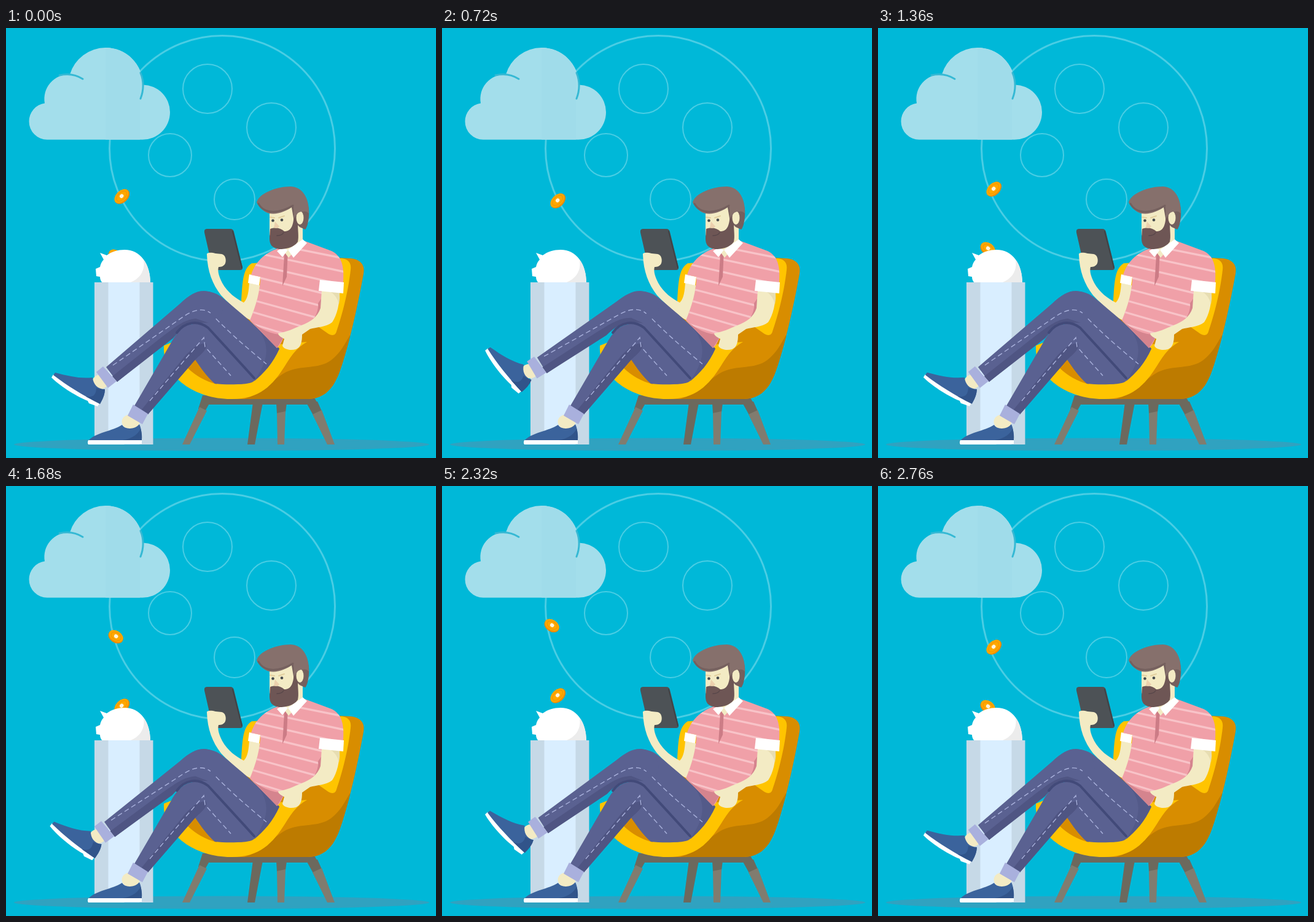
Animation of 700x700 px, one loop 2800 ms. Source, as an HTML page with a canvas:

```html
<!DOCTYPE html>
<html lang="en">
<head>
<meta charset="utf-8">
<title>Savings</title>
<style>
html, body { margin: 0; width: 100%; height: 100%; overflow: hidden; background: #00b8d8; }
canvas { display: block; }
</style>
</head>
<body>
<canvas id="stage" width="700" height="700"></canvas>
<script>
const ctx = document.getElementById('stage').getContext('2d');
const PERIOD = 1400, STEP = 40;
const C = {
  sky: '#00b8d8', outline: 'rgba(255,255,255,.29)', cloud: '#a3deeb', cloudShade: '#a0dcea',
  skin: '#f3ebc4', skinShade: '#e7ddb2', shirt: '#f0a0a8', shirtShade: '#d5848e', stripe: '#f8c3c8',
  pants: '#5a6191', pantsShade: '#4f5583', hipShade: '#535a89', crease: '#424a79', stitch: '#a9b1dc',
  cuff: '#a9b0dd', shoe: '#3b639c', shoeShade: '#31548a', yellow: '#ffc400', orange: '#d88d00',
  brown: '#bd7b00', wood: '#6c695d', woodLight: '#807c6f', hair: '#86706c', hairShade: '#75605e',
  beard: '#6e5655'
};

function fill(color, d) {
  ctx.fillStyle = color;
  ctx.fill(new Path2D(d));
}
function line(color, width, d, dash = []) {
  ctx.strokeStyle = color;
  ctx.lineWidth = width;
  ctx.lineCap = dash.length ? 'butt' : 'round';
  ctx.setLineDash(dash);
  ctx.stroke(new Path2D(d));
}
function oval(color, x, y, rx, ry = rx, turn = 0) {
  ctx.fillStyle = color;
  ctx.beginPath();
  ctx.ellipse(x, y, rx, ry, turn, 0, Math.PI * 2);
  ctx.fill();
}
function ring(x, y, r, width) {
  ctx.strokeStyle = C.outline;
  ctx.lineWidth = width;
  ctx.setLineDash([]);
  ctx.beginPath();
  ctx.arc(x, y, r, 0, Math.PI * 2);
  ctx.stroke();
}
function box(color, x, y, w, h) {
  ctx.fillStyle = color;
  ctx.fillRect(x, y, w, h);
}
function clipped(d, draw) {
  ctx.save();
  ctx.clip(new Path2D(d));
  draw();
  ctx.restore();
}
function rotateAbout(x, y, degrees) {
  ctx.translate(x, y);
  ctx.rotate(degrees * Math.PI / 180);
  ctx.translate(-x, -y);
}

function backdrop() {
  box(C.sky, 0, 0, 700, 700);
  ring(352, 196, 183.5, 3);
  ring(328, 99, 40, 2);
  ring(432, 162, 40, 2);
  ring(267, 207, 35, 2);
  ring(372, 279, 33, 2);
  oval('#30a2c0', 351, 678, 338, 10.5);
}

function coin(x, y, rx, turn) {
  ctx.save();
  ctx.translate(x, y);
  ctx.rotate(turn);
  oval('#f08c00', 0, .6, rx, 9.6);
  oval('#ffa800', -.3, -.7, rx - .6, 8.4);
  ctx.strokeStyle = '#f39200';
  ctx.lineWidth = 1;
  ctx.setLineDash([]);
  ctx.beginPath();
  ctx.ellipse(0, -.5, rx - 4, 5.8, 0, 0, Math.PI * 2);
  ctx.stroke();
  oval('#fff4dc', 0, -.4, 3.4, 3);
  ctx.restore();
}

function coins(t) {
  const fall = start => 90 + (start - 90 + .3 * t + 420) % 420;
  for (const start of [274, 65]) coin(188.5, fall(start), 14.2, -.78);
  for (const start of [161, -49]) coin(179, fall(start), 13, .58);
}

function cloud() {
  const shape = 'M67 181.8A29.5 29.8 0 0 1 37.5 152A29.5 29.8 0 0 1 63 122.5A40 40 0 0 1 104 75.5A61 61 0 0 1 162 32A61 61 0 0 1 223 92.5A44.4 44.6 0 0 1 267 137A44.8 44.8 0 0 1 222 181.8Z';
  fill(C.cloud, shape);
  clipped(shape, () => box(C.cloudShade, 162, 30, 56, 152));
  line('#36b9d4', 3, 'M87 77C100 74 114 76 125 83');
  line('#36b9d4', 3, 'M219 73C225 88 224 102 219 115');
}

function pigAndColumn() {
  const pig = 'M153 366L164 370C172 364 182 361 193 361C219 361 235 384 235 415H157C154 412 153 408 153 405L147 404L146 392L153 389C154 384 156 380 159 377Z';
  fill('#fff', pig);
  clipped(pig, () => fill('#ececec', 'M200 415C216 410 227 397 224 378L240 376V415Z'));
  box('#c6d9e7', 144, 414, 95.5, 264);
  box('#d9eeff', 166.5, 414, 51, 264);
}

function chair() {
  fill(C.wood, 'M320 598H500L508 613H330L325 622L313 620Z M402 610H418L405 678H393Z M440 610H457L455 626L441 627Z M489 610L507 608L515 626L500 630Z');
  fill(C.woodLight, 'M315 617L327 623L299 678H287Z M441 627L455 624L453 678H442Z M499 629L514 622L535 678H523Z');
  const shell = 'M400 400L541 374L560 375C577 376 585 386 582 400C575 440 562 500 551 535C541 568 531 604 490 604H360Z';
  fill(C.orange, shell);
  clipped(shell, () => fill(C.brown, 'M385 605C420 594 432 573 456 560C483 548 508 556 529 541C545 529 552 513 560 500V605Z'));
  fill(C.yellow, 'M383 445C385 410 386 392 400 383L540 375C556 374 563 381 561 394C557 430 547 468 538 494C536 501 531 501 525 498L505 484L400 480Z');
  fill(C.yellow, 'M257 517L300 500L445 515L490 511C474 520 466 531 456 547C434 583 412 604 368 604C312 605 254 570 257 517Z');
  fill(C.orange, 'M309 537L295 553C310 567 325 575 343 580L330 545Z');
}

function leftArm() {
  fill('#4d5256', 'M327 327H365Q370 327 371 332L385 389Q386 394 381 394H342Q337 394 336 390L323 333Q322 327 327 327Z');
  line('#3f4346', 2, 'M369 331L384 390');
  fill(C.skin, 'M327 369C326 365 335 365 341 367L351 368C357 369 359 377 357 383C355 388 350 389 346 389C344 396 347 405 352 415C361 431 374 440 387 447C394 440 395 428 396 415L413 419C412 442 409 464 400 476C392 475 369 455 350 435C336 417 328 396 327 369Z');
  fill('#fff', 'M396 401L414 405L412 419L394 415Z');
}

function raisedFoot() {
  oval(C.skin, 153.5, 576, 13, 11.5);
  fill('#fff', 'M77 564L154 608L149 616L135 611L133 607C111 598 86 581 74 569Z');
  fill(C.shoe, 'M80 561C103 567 120 571 141 569C142 580 149 588 161 588C161 597 157 605 153 612C127 599 99 582 77 565Z');
  fill(C.shoeShade, 'M147 586Q154 589 161 588C161 597 157 605 153 612L130 600Q147 603 147 586Z');
}

function crossedLeg(swing) {
  fill(C.pants, 'M296 440C310 427 332 424 351 438C366 450 382 464 397 477L445 522C435 545 420 562 402 576C390 582 365 580 350 575L310 495Z');
  fill(C.hipShade, 'M404 483L445 522C434 546 420 562 404 575C424 546 436 516 404 483Z');
  line(C.stitch, 1.4, 'M333 464C358 491 391 520 424 547', [8, 5]);
  ctx.save();
  rotateAbout(322, 460, 5.5 * swing);
  ctx.save();
  rotateAbout(155, 573, 14.5 * swing);
  raisedFoot();
  ctx.restore();
  fill(C.pants, 'M163 552L283 449C298 435 309 428 322 428C341 428 354 444 352 462C345 480 312 474 289 486C275 495 265 508 250 519L181 576Z');
  fill(C.pantsShade, 'M181 576L173 567L255 502C277 486 289 475 309 473L330 480C300 478 287 487 272 505Z');
  line(C.stitch, 1.4, 'M174 549L290 469C309 456 324 457 333 464', [8, 5]);
  fill(C.cuff, 'M147 560L158 551L180 575L166 586Z');
  ctx.restore();
}

function standingLeg() {
  oval(C.skin, 203, 641, 14.5, 12);
  fill('#fff', 'M134 671H221V677H193L192 678H134Q132 675 134 671Z');
  fill(C.shoe, 'M135 671C145 659 174 656 189 646C193 654 210 654 217 645C221 653 221 663 221 671Z');
  fill(C.shoeShade, 'M190 671C207 668 216 660 219 652Q222 662 221 671Z');
  fill(C.pants, 'M209 615L269 512C284 483 308 473 329 490C352 515 380 545 406 573C390 582 360 581 340 579C327 568 317 553 308 540L231 629Z');
  fill(C.pantsShade, 'M231 629L221 621L293 532C306 519 314 514 325 513C330 521 319 530 308 540Z');
  line(C.crease, 4, 'M278 496C291 478 312 475 329 488C352 513 377 540 404 570');
  line(C.stitch, 1.4, 'M234 607L322 504L324 519L366 566', [8, 5]);
  fill(C.cuff, 'M207 613L231 628L222 645L198 631Z');
}

function torso() {
  const shirt = 'M445 358C420 366 405 382 399 402L414 405C414 428 407 452 397 476L441 521C447 517 450 507 455 499L507 484C516 462 518 443 520 430L549 414C551 386 546 371 530 363L487 347Z';
  fill(C.shirt, shirt);
  clipped(shirt, () => {
    for (let i = -1; i < 8; i++) {
      const y = 361 + i * 20.7, slope = .2 + i * .015;
      line(C.stripe, 3.2, `M390 ${y - 90 * slope}L555 ${y + 75 * slope}`);
    }
    fill(C.shirtShade, 'M397 476L441 521L455 499Q426 501 397 476Z M522 428L508 448Q510 466 490 488L515 490Z');
  });
  fill('#cc7c86', 'M453 369L459 361L457 405L450 420Z');
  fill(C.skin, 'M514 427L542 430C544 447 539 467 531 479C521 487 505 487 495 490L482 499C482 511 480 520 472 523C462 526 451 522 450 517L453 506C447 503 443 500 443 497C457 495 469 489 481 484C496 478 507 471 512 456Z');
  fill(C.skinShade, 'M526 428L543 430Q544 440 542 450Q539 435 526 428Z');
  fill('#fff', 'M511 410L550 414L549 432L509 428Z');
}

function head() {
  fill(C.skin, 'M465 320H483V348L460 374L449 359Z');
  fill('#fff', 'M441 363L449 358L459 361L483 344L490 350L468 374L459 361L450 373Z');
  fill(C.skin, 'M429 296L472 286L474 340L440 350L429 337Z');
  fill(C.hairShade, 'M462 275C493 275 494 290 493 307C492 317 490 325 487 328L478 324L469 315Z');
  fill(C.beard, 'M430 327C439 324 448 326 453 331C465 331 469 321 469 296L475 317C475 329 477 340 475 348C468 358 455 360 445 360C433 358 429 353 429 342Z');
  oval(C.skin, 478.5, 309, 6, 11);
  fill(C.hair, 'M408 284C412 269 440 258 464 258C484 259 494 279 493 302Q489 297 483 299C476 298 472 304 469 311L468 290C455 299 442 304 429 302C418 299 412 291 408 284Z');
  line(C.hairShade, 3, 'M411 286C421 304 445 302 467 289');
  line('#e2cf9e', 2, 'M430 308L437 309M444 309L453 306');
  fill('#ecd0ad', 'M438 315L445 323Q442 327 436 325Z');
  oval('#454a4c', 434.5, 313.5, 2.3);
  oval('#454a4c', 449, 312.5, 2.3);
  line('#57464a', 1.4, 'M441 338Q449 338 452 333');
}

function render(now) {
  const t = Math.floor(now / STEP) * STEP % PERIOD;
  const swing = (1 - Math.cos(2 * Math.PI * t / PERIOD)) / 2;
  backdrop();
  coins(t);
  cloud();
  pigAndColumn();
  chair();
  leftArm();
  crossedLeg(swing);
  standingLeg();
  torso();
  head();
}

const begin = performance.now();
function tick() {
  render(performance.now() - begin);
  requestAnimationFrame(tick);
}
tick();
</script>
</body>
</html>
```
